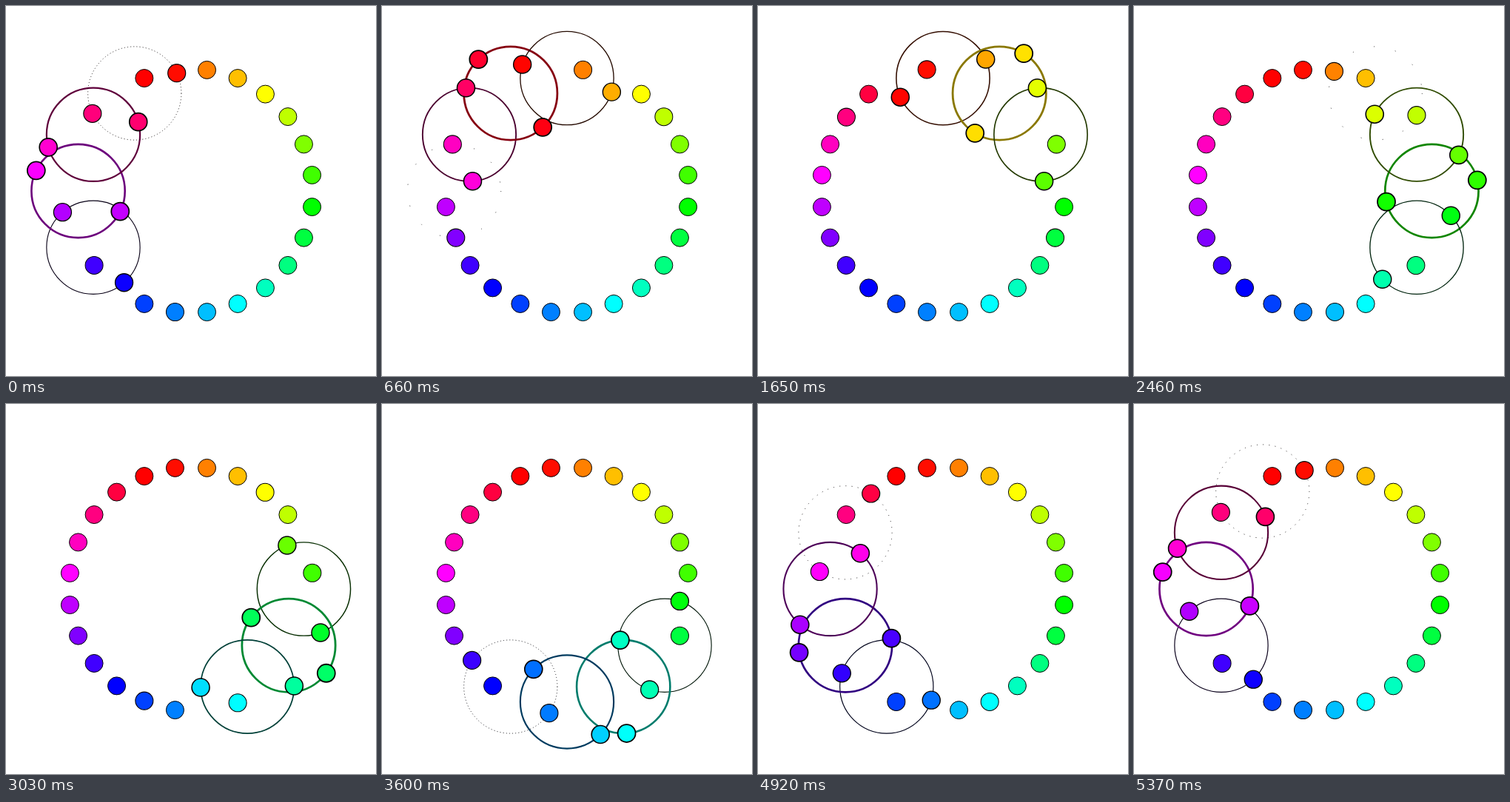
An HTML page for the animation above (5400 ms loop, 500 by 500 pixels).

```html
<!DOCTYPE html>
<html lang="en">
<head>
<meta charset="utf-8">
<title>Swapping colour wheel</title>
<style>
  html, body { margin: 0; width: 100%; height: 100%; overflow: hidden; background: #fff; }
  svg { display: block; width: 100%; height: 100%; }
</style>
</head>
<body>
<svg id="stage" viewBox="0 0 500 500"></svg>
<script>
const LOOP = 5400, STEP = 30, COUNT = 12;
const SPACING = LOOP / COUNT;
const HALF_SWAP = 1080;   // half the length of one swap, in ms
const FIRST_MID = 2541;   // middle of the swap on the rightmost ring
const CENTER = 250, WHEEL = 165;
const rad = deg => deg * Math.PI / 180;
const ORBIT = WHEEL * Math.cos(rad(22.5));
const RING = WHEEL * Math.sin(rad(22.5));

const stage = document.getElementById("stage");
const ringLayer = addNode(stage, "g", { fill: "none" });
const dotLayer = addNode(stage, "g", { stroke: "#000" });

function setAttrs(node, attrs) {
  for (const name in attrs) node.setAttribute(name, attrs[name]);
}

function addNode(parent, tag, attrs) {
  const node = document.createElementNS("http://www.w3.org/2000/svg", tag);
  setAttrs(node, attrs);
  return parent.appendChild(node);
}

function polar(cx, cy, radius, deg) {
  return [cx + radius * Math.cos(rad(deg)), cy + radius * Math.sin(rad(deg))];
}

// Orange-reds are pulled towards pure red.
function tone(hue) {
  const h = (hue + 720) % 360;
  if (h < 15) return h * 0.2;
  if (h < 30) return 3 + (h - 15) * 1.8;
  return h;
}

const pairs = Array.from({ length: COUNT }, (_, i) => {
  const angle = i * 30;
  const [cx, cy] = polar(CENTER, CENTER, ORBIT, angle);
  return {
    angle, cx, cy,
    hue: angle - 270,
    mid: FIRST_MID + i * SPACING,
    ring: addNode(ringLayer, "circle", { cx, cy, r: RING }),
    dots: [-1, 1].map(side => ({ side, node: addNode(dotLayer, "circle", { r: 12 }) }))
  };
});

function drawRing(pair, speed) {
  const visible = speed > 0.1;
  pair.ring.setAttribute("visibility", visible ? "visible" : "hidden");
  if (!visible) return;
  const gap = Math.pow(0.32 / speed, 4) - 1;
  setAttrs(pair.ring, {
    stroke: `hsl(${tone(pair.hue + 22.5)},100%,${27 * speed * speed}%)`,
    "stroke-width": 0.8 + 2 * speed * speed,
    "stroke-dasharray": gap > 0 ? `1 ${gap}` : "none"
  });
}

function draw(time) {
  for (const pair of pairs) {
    // u runs from -1 to 1 over the swap; the speed is a raised cosine.
    const sinceMid = ((time - pair.mid + LOOP / 2) % LOOP + LOOP) % LOOP - LOOP / 2;
    const u = Math.max(-1, Math.min(1, sinceMid / HALF_SWAP));
    const progress = (1 + u + Math.sin(Math.PI * u) / Math.PI) / 2;
    const speed = (1 + Math.cos(Math.PI * u)) / 2;

    drawRing(pair, speed);
    for (const { side, node } of pair.dots) {
      const [cx, cy] = polar(pair.cx, pair.cy, RING, pair.angle + side * 90 + progress * 180);
      const share = side < 0 ? progress : 1 - progress;
      setAttrs(node, {
        cx, cy,
        fill: `hsl(${tone(pair.hue + 45 * share)},100%,50%)`,
        "stroke-width": 1 + 0.8 * speed
      });
    }
  }
}

const start = performance.now();
function tick() {
  const time = (performance.now() - start) % LOOP;
  draw(Math.floor(time / STEP) * STEP);
  requestAnimationFrame(tick);
}
tick();
</script>
</body>
</html>
```
